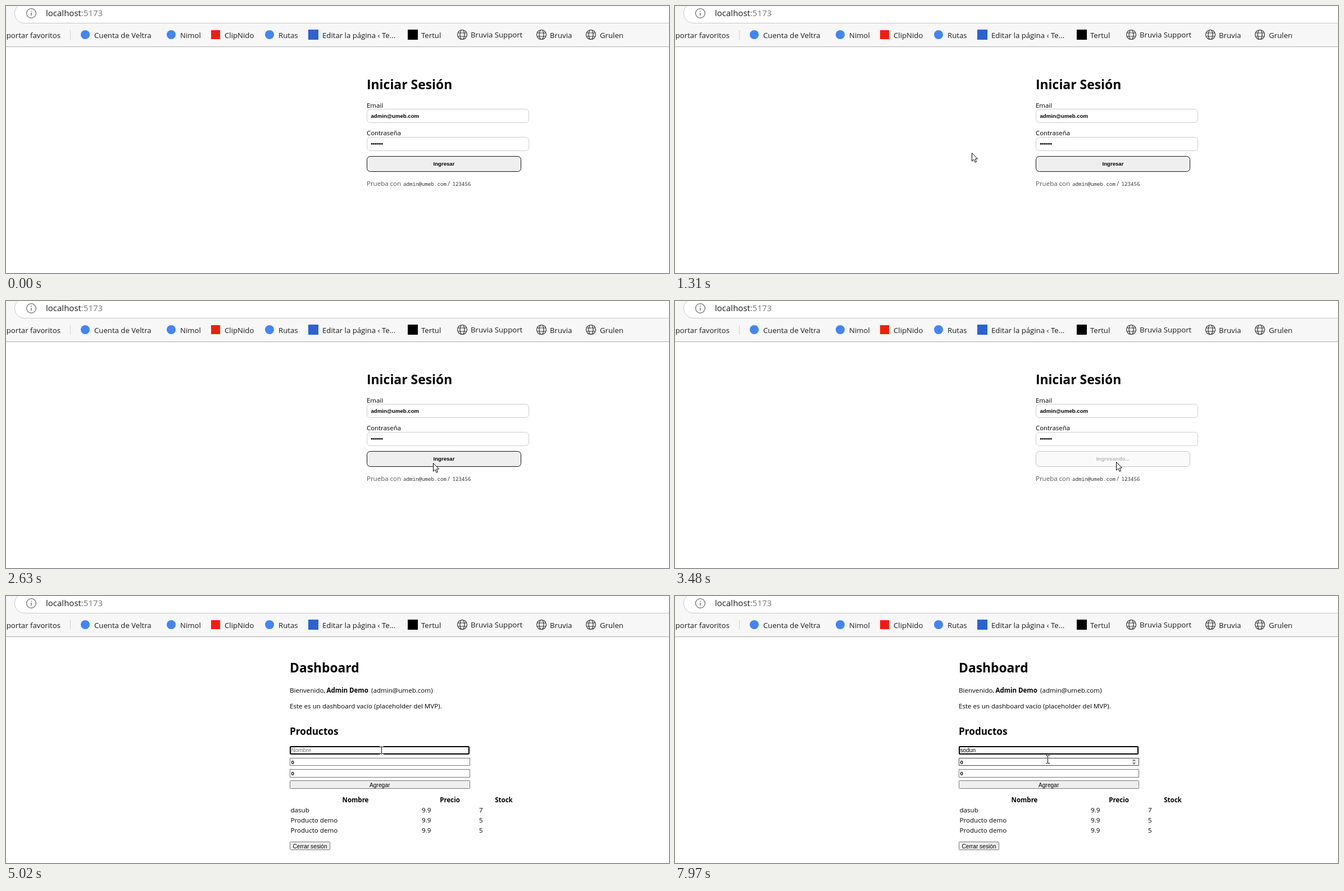
An HTML page with a canvas that plays this animation: 1180 px wide and 475 px high, repeating every 8000 ms.

```html
<!DOCTYPE html>
<html lang="es">
<head>
<meta charset="utf-8">
<title>Iniciar sesión</title>
<style>
html, body { margin: 0; width: 100%; height: 100%; overflow: hidden; background: #fff; }
canvas { display: block; }
</style>
</head>
<body>
<canvas id="stage" width="1180" height="475"></canvas>
<script>
const ctx = document.getElementById('stage').getContext('2d');
const LOOP = 8000;
const UI = '"Open Sans", sans-serif';
const FORM = '"Liberation Sans", Arial, sans-serif';
const MONO = '"Noto Sans Mono", monospace';
const BODY = '11.6px ' + UI;
const BOLD = 'bold 11.5px ' + UI;
const FIELD = '10.1px ' + FORM;
const FIELD_BOLD = 'bold 9.6px ' + FORM;
const EMAIL = 'admin@umeb.com';
const WORD = 'sodun';

// Each move jumps through its path in equal steps.
const moves = [
  { from: 500, to: 1250, steps: 11, path: [[448, 466], [440, 385], [436, 330], [466, 290], [520, 270], [556, 268], [540, 266]] },
  { from: 1310, to: 2080, steps: 12, path: [[528, 261], [534, 252], [556, 272], [588, 299], [622, 302], [658, 279], [691, 283]] },
  { from: 2150, to: 2820, steps: 10, path: [[699, 284], [728, 288], [760, 288], [785, 286]] },
  { from: 3960, to: 4290, steps: 5, path: [[776, 281], [735, 276], [690, 273], [668, 274]] },
  { from: 7830, to: 7970, steps: 3, path: [[667, 278], [665, 284], [663, 290]] }
];
const keyTimes = [5420, 5820, 6500, 6700, 6970];
const BLINK = 530;

function pointOn(path, k) {
  const p = k * (path.length - 1);
  const i = Math.min(Math.floor(p), path.length - 2);
  return [0, 1].map(a => Math.round(path[i][a] + (path[i + 1][a] - path[i][a]) * (p - i)));
}

function cursorAt(t) {
  const move = moves.filter(m => t >= m.from).pop();
  if (!move) return null;
  const step = (move.to - move.from) / (move.steps - 1);
  const index = Math.min(move.steps - 1, Math.floor((t - move.from) / step + 1e-6));
  return pointOn(move.path, index / (move.steps - 1));
}

function text(str, x, y, font = BODY, color = '#000', align = 'left') {
  ctx.font = font;
  ctx.fillStyle = color;
  ctx.textAlign = align;
  ctx.fillText(str, x, y);
  return x + ctx.measureText(str).width;
}

function box(x, y, w, h, radius, fill, stroke, line = 1) {
  const d = line / 2;
  ctx.beginPath();
  ctx.roundRect(x + d, y + d, w - line, h - line, radius);
  ctx.fillStyle = fill;
  ctx.fill();
  ctx.strokeStyle = stroke;
  ctx.lineWidth = line;
  ctx.stroke();
}

function rect(x, y, w, h, color) {
  ctx.fillStyle = color;
  ctx.fillRect(x, y, w, h);
}

function disc(x, y, r, color) {
  ctx.beginPath();
  ctx.arc(x, y, r, 0, 7);
  ctx.fillStyle = color;
  ctx.fill();
}

function polygon(points, fill) {
  ctx.beginPath();
  points.forEach(p => ctx.lineTo(...p));
  ctx.closePath();
  ctx.fillStyle = fill;
  ctx.fill();
}

function globe(x, y) {
  ctx.strokeStyle = '#333';
  ctx.lineWidth = 1.2;
  ctx.beginPath();
  ctx.arc(x, y, 8.5, 0, 7);
  ctx.moveTo(x + 4, y);
  ctx.ellipse(x, y, 4, 8.5, 0, 0, 7);
  for (const dy of [-3, 3]) {
    ctx.moveTo(x - 8, y + dy);
    ctx.lineTo(x + 8, y + dy);
  }
  ctx.stroke();
}

function drawBrowser() {
  rect(0, 0, 1180, 72, '#f7f7f7');
  rect(0, 72, 1180, 1, '#adadad');
  box(15, -5, 1200, 36, 18, '#fff', '#c8c8c8');

  ctx.beginPath();
  ctx.arc(45, 13, 8.4, 0, 7);
  ctx.strokeStyle = '#666';
  ctx.lineWidth = 1.2;
  ctx.stroke();
  rect(44.3, 12, 1.4, 5, '#666');
  rect(44.3, 8.6, 1.4, 1.6, '#666');
  const end = text('localhost', 71, 18, '15px ' + UI, '#1b1b1b');
  text(':5173', end, 18, '15px ' + UI, '#767676');

  const label = (str, x, y = 57, align) => text(str, x, y, '13.2px ' + UI, '#1b1b1b', align);
  label('Importar favoritos', 97, 57, 'right');
  rect(114, 43, 1, 17, '#d0d0d0');
  for (const x of [141, 294, 469]) disc(x, 51, 8, '#4285f4');
  rect(365, 43, 16, 16, '#f61c0d');
  rect(538, 42, 18, 18, '#2a62d0');
  rect(715, 42, 18, 18, '#000');
  for (const x of [812, 953, 1041]) globe(x, 51);
  label('Cuenta de Veltra', 157);
  label('Nimol', 310);
  label('ClipNido', 389);
  label('Rutas', 485);
  label('Editar la página ‹ Te...', 563);
  label('Tertul', 739);
  label('Bruvia Support', 827, 56);
  label('Bruvia', 968);
  label('Grulen', 1057);
}

function drawLogin(t) {
  text('Iniciar Sesión', 642, 148, 'bold 22.9px ' + UI);
  text('Email', 642, 181, '11.4px ' + UI);
  box(642, 183, 289, 25, 6, '#fff', '#ccc');
  text(EMAIL, 649.5, 199, FIELD_BOLD);
  text('Contraseña', 642, 230, '11.4px ' + UI);
  box(642, 233, 289, 25, 6, '#fff', '#ccc');
  for (let i = 0; i < 6; i++) disc(651.2 + i * 3.6, 245.2, 1.45, '#000');

  const busy = t >= 3480;
  box(642, 267, 275, 28, 6, busy ? '#fafafa' : t >= 3420 ? '#f5f5f5' : '#efefef', busy ? '#c3c3c3' : '#111');
  text(busy ? 'Ingresando...' : 'Ingresar', 779.5, 284, FIELD_BOLD, busy ? '#b8b8b8' : '#000', 'center');

  text('Prueba con', 642, 320, '11.5px ' + UI, '#555');
  text(EMAIL, 707, 320, '9.17px ' + MONO, '#333');
  text('/', 786, 320, BODY, '#555');
  text('123456', 794.5, 320, '9.17px ' + MONO, '#333');
}

function drawNameField(t, hover) {
  const focused = t >= 4490;
  if (focused) box(505, 267, 320, 15, 1, '#fff', '#000', 2);
  else box(505, 267, 321, 15, 0, '#fff', hover ? '#444' : '#767676');

  const typed = keyTimes.filter(k => t >= k).length;
  if (!typed) text('Nombre', 507.5, 278, FIELD, '#757575');
  const end = text(WORD.slice(0, typed), 507.5, 278, FIELD);
  const since = t - (typed ? keyTimes[typed - 1] : 4490);
  const caret = Math.max(508, Math.floor(end));
  if (focused && Math.floor(since / BLINK) % 2 === 0) rect(caret, 269, 1, 11, '#000');
}

function drawDashboard(t, cursor) {
  const [, y] = cursor;
  const overName = y >= 267 && y <= 282;
  const overPrice = y >= 288 && y <= 302;

  text('Dashboard', 505, 136, 'bold 22.8px ' + UI);
  text('Bienvenido, ', 505, 172);
  text('Admin Demo', 570.5, 172, BOLD);
  text(`(${EMAIL})`, 650, 172);
  text('Este es un dashboard vacío (placeholder del MVP).', 505, 200);
  text('Productos', 505, 247, 'bold 17.2px ' + UI);

  drawNameField(t, overName);
  box(505, 288, 321, 14, 0, '#fff', overPrice ? '#444' : '#767676');
  box(505, 308, 321, 15, 0, '#fff', '#767676');
  text('0', 507.5, 299, FIELD_BOLD);
  text('0', 507.5, 319, FIELD_BOLD);
  if (overPrice) {
    rect(812, 289.5, 10, 11, '#f1f1f1');
    polygon([[814, 293.6], [817, 290.3], [820, 293.6]], '#777');
    polygon([[814, 296.6], [817, 299.9], [820, 296.6]], '#777');
  }
  box(505, 328, 321, 15, 1, '#efefef', '#767676');
  text('Agregar', 665.2, 339.5, '10.2px ' + FORM, '#000', 'center');

  text('Nombre', 622, 367, BOLD, '#000', 'center');
  text('Precio', 790, 367, BOLD, '#000', 'center');
  text('Stock', 886, 367, BOLD, '#000', 'center');
  const rows = [['dasub', 7], ['Producto demo', 5], ['Producto demo', 5]];
  rows.forEach(([name, stock], i) => {
    const base = 385 + i * 18;
    text(name, 506.5, base);
    text('9.9', 740, base);
    text(stock, 842, base);
  });

  box(505, 437, 72, 15, 1, '#efefef', '#767676');
  text('Cerrar sesión', 541, 448.5, '10.2px ' + FORM, '#000', 'center');
  if (overName || overPrice) drawBeam(...cursor);
  else drawArrow(...cursor);
}

function drawArrow(x, y) {
  ctx.save();
  ctx.translate(x + 0.5, y);
  polygon([[0, 0.5], [0, 15], [3.4, 12], [5.7, 17.2], [8, 16.2], [5.8, 11], [10, 11]], '#fff');
  ctx.strokeStyle = '#000';
  ctx.lineWidth = 1;
  ctx.stroke();
  ctx.restore();
}

// The text pointer inverts whatever lies below it.
function drawBeam(x, y) {
  ctx.save();
  ctx.globalCompositeOperation = 'difference';
  rect(x, y - 6, 1, 13, '#fff');
  for (const dy of [-7, 7]) {
    rect(x - 3, y + dy, 3, 1, '#fff');
    rect(x + 1, y + dy, 3, 1, '#fff');
  }
  ctx.restore();
}

function draw(t) {
  rect(0, 0, 1180, 475, '#fff');
  drawBrowser();
  const cursor = cursorAt(t);
  if (t >= 3540) drawDashboard(t, cursor);
  else {
    drawLogin(t);
    if (cursor) drawArrow(...cursor);
  }
}

const start = performance.now();
function tick() {
  draw((performance.now() - start) % LOOP);
  requestAnimationFrame(tick);
}
tick();
</script>
</body>
</html>
```
